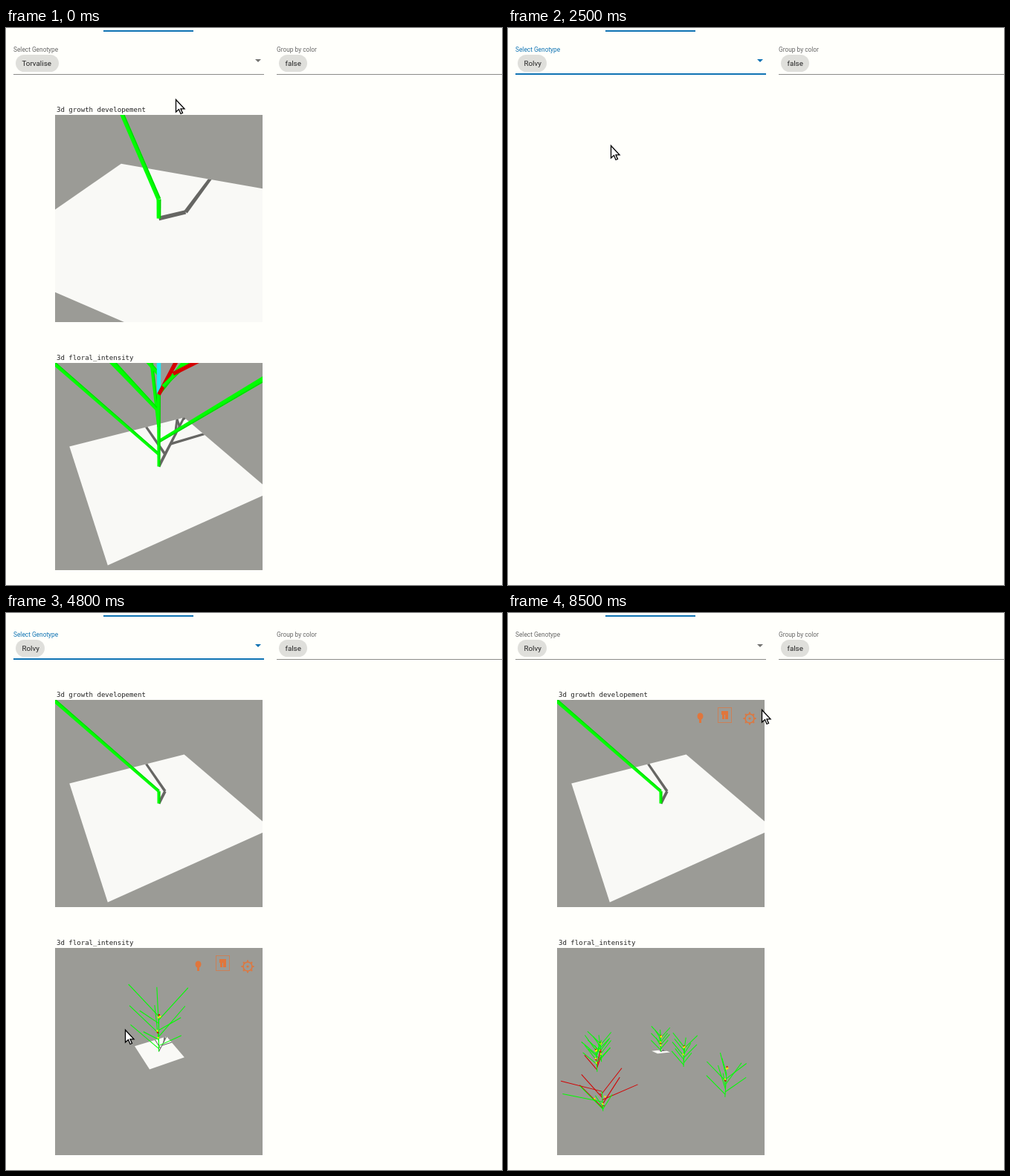
Write an HTML page with a canvas that moves like this. It is 667 px wide and 750 px high and loops after 8900 ms.

```html
<!DOCTYPE html>
<html lang="en">
<head>
<meta charset="utf-8">
<title>Plant growth dashboard</title>
<style>
  html, body { margin: 0; width: 100%; height: 100%; overflow: hidden; background: #fffffb; }
  canvas { display: block; }
</style>
</head>
<body>
<canvas id="stage" width="667" height="750"></canvas>
<script>
const ctx = document.getElementById('stage').getContext('2d');
const LOOP = 8900, SIZE = 279, MID = SIZE / 2, FOCAL = 300, LEFT = 66, THICK = .0138;
const BLUE = '#0f73b3', GREEN = '#0f0', RED = '#d40000', YELLOW = '#fff000', CYAN = '#20e8f8';
const NAMES = ['Torvalise', 'Balistrine', 'Rolvy'];
const rad = deg => deg * Math.PI / 180;

// Linear interpolation through [time, ...values] keys.
function track(keys, t) {
  if (t <= keys[0][0]) return keys[0].slice(1);
  for (let i = 1; i < keys.length; i++) {
    const [a, ...from] = keys[i - 1], [b, ...to] = keys[i];
    if (t <= b) return from.map((v, j) => v + (to[j] - v) * (t - a) / (b - a));
  }
  return keys[keys.length - 1].slice(1);
}

const POINTER = [[200, 228, 96], [600, 226, 50], [800, 226, 50], [1600, 138, 158], [2700, 138, 158],
  [3200, 146, 535], [3600, 160, 561], [5600, 160, 561], [6000, 153, 541], [6200, 153, 541],
  [6500, 179, 574], [7600, 179, 574], [8000, 340, 133], [8400, 340, 133], [8500, 341, 130]];
const DISTANCE = [[3600, 2.12], [4100, 2.611], [4200, 2.611], [4300, 3.5], [4400, 4.75], [4600, 4.75],
  [4700, 6.5], [4800, 8.5], [5000, 12.4], [5300, 12.4], [5500, 18.1], [6500, 18.1], [6800, 20.5],
  [7000, 20.5], [7200, 22.9]];
const ELEVATION = [[5600, 41.2], [6200, 13], [6500, 11.8]];
const PANEL = [[800, 0], [1100, 1], [1600, 1], [1700, .7], [1800, .28], [1900, .1], [2000, 0]];
const ARROW = [[800, 0], [1000, 180], [1600, 180], [1900, 0]];
const FOCUS = [[700, 0], [800, .6], [900, .9], [1000, 1], [5900, 1], [6000, .45], [6100, .12], [6200, .012], [6300, 0]];

const camera = (distance, elevation, turn = 0) => ({ distance, elevation: rad(elevation), turn: rad(turn) });

// Points are [x, y, height]; the camera orbits the origin.
function view([x, y, h], cam) {
  const c = Math.cos(cam.turn), s = Math.sin(cam.turn);
  const X = x * c - y * s, Y = x * s + y * c;
  const se = Math.sin(cam.elevation), ce = Math.cos(cam.elevation);
  return [X, Y * se - h * ce, cam.distance - Y * ce - h * se];
}
const flat = ([x, y, z]) => [MID + FOCAL * x / z, MID + FOCAL * y / z, FOCAL / z];

function polygon(points, color) {
  ctx.beginPath();
  points.forEach(p => ctx.lineTo(p[0], p[1]));
  ctx.closePath();
  ctx.fillStyle = color;
  ctx.fill();
}

function rod(from, to, color, cam) {
  const near = .09;
  let a = view(from, cam), b = view(to, cam);
  if (a[2] < near && b[2] < near) return;
  const cut = (p, q) => p.map((v, i) => v + (q[i] - v) * (near - p[2]) / (q[2] - p[2]));
  if (a[2] < near) a = cut(a, b);
  if (b[2] < near) b = cut(b, a);
  a = flat(a); b = flat(b);
  const len = Math.hypot(b[0] - a[0], b[1] - a[1]) || 1;
  const nx = (a[1] - b[1]) / len, ny = (b[0] - a[0]) / len;
  const side = (p, sign) => {
    const w = sign * Math.max(.5, THICK * p[2]);
    return [p[0] + nx * w, p[1] + ny * w];
  };
  polygon([side(a, 1), side(b, 1), side(b, -1), side(a, -1)], color);
  if (color === GREEN && a[2] > 90) {
    ctx.strokeStyle = 'rgba(0,110,0,.4)';
    ctx.lineWidth = 1;
    ctx.beginPath();
    ctx.moveTo(...side(a, .7));
    ctx.lineTo(...side(b, .7));
    ctx.stroke();
  }
}

// Leaves follow a spiral of nearly 2/5 turn along the stem.
function makePlant({ x = 0, y = 0, leaves = 11, start = 187, spread = 1, rise = 1, step = .142,
                     redLeaves = () => false, top = GREEN, extras = [], flowers = [] }) {
  const at = (dx, dy, h) => [x + dx, y + dy, h];
  const node = i => .148 + i * step;
  const rods = [];
  for (let i = 0; i < leaves; i++) {
    const angle = rad(start - 143 * i);
    rods.push([at(0, 0, node(i)), at(spread * Math.cos(angle), spread * Math.sin(angle), node(i) + rise),
      redLeaves(i) ? RED : GREEN]);
  }
  const split = Math.min(node(4), node(leaves - 1));
  rods.push([at(0, 0, 0), at(0, 0, split), GREEN]);
  if (leaves > 5) rods.push([at(0, 0, split), at(0, 0, node(leaves - 1)), top]);
  extras.forEach(([x1, h1, x2, h2, color]) => rods.push([at(x1, 0, h1), at(x2, 0, h2), color]));
  return { rods, flowers: flowers.map(([dx, h, color]) => [at(dx, 0, h), color]) };
}

function drawFlower([point, color], cam) {
  const p = view(point, cam);
  if (p[2] < .3) return;
  const [x, y, scale] = flat(p), r = Math.max(1.2, .034 * scale);
  if (color === YELLOW) {
    polygon([[x - r, y - r * .7], [x + r * .3, y - r * 1.1], [x + r, y - r * .8], [x + r * .8, y + r], [x - r * .2, y + r * .8]], color);
  } else {
    polygon([[x - r, y], [x - r * .5, y - r], [x + r * .5, y - r * .8], [x + r * 1.6, y + r * 1.2], [x - r * .3, y + r * .8]], color);
  }
}

const blooms = [[-.03, .66, YELLOW], [-.045, .9, RED], [-.06, .97, YELLOW], [-.02, 1.52, YELLOW], [.01, 1.62, RED], [.04, 1.56, YELLOW]];
const seedling = makePlant({ leaves: 1 });
const firstField = [makePlant({
  leaves: 9, redLeaves: i => i === 7, top: CYAN,
  extras: [[0, .71, .12, .945, RED], [.03, .77, .22, .96, GREEN], [.1, .86, .3, .96, RED]]
})];
const secondField = [
  makePlant({ flowers: blooms }),
  makePlant({ x: -5, y: 4.2, start: 170, flowers: blooms }),
  makePlant({ x: 1.76, y: 5.75, start: 205, flowers: blooms.slice(2) }),
  makePlant({ x: -4.55, y: 7.1, start: 200, redLeaves: i => i < 3, flowers: blooms }),
  makePlant({ x: 3.33, y: 11.57, start: 185, leaves: 9, flowers: blooms.slice(1) }),
  makePlant({ x: -2.6, y: 13.14, start: 215, leaves: 9, spread: 1.6, rise: .75, step: .1,
    redLeaves: i => i !== 3, flowers: [[-.35, .6, YELLOW], [.12, .7, YELLOW], [0, .35, YELLOW]],
    extras: [[0, .1, -.95, 1.2, GREEN], [0, .1, .45, .8, GREEN], [0, .2, -.3, .75, GREEN]] })
];

function drawIcons() {
  ctx.fillStyle = ctx.strokeStyle = '#e0763c';
  ctx.lineWidth = 1;
  ctx.beginPath();
  ctx.ellipse(192.5, 22, 4, 4.5, 0, 0, 7);
  ctx.fill();
  ctx.fillRect(191, 26, 3, 5);
  ctx.globalAlpha *= .7;
  ctx.strokeRect(216.5, 10.5, 18, 20);
  ctx.globalAlpha /= .7;
  ctx.fillRect(221, 15, 9, 5);
  ctx.fillRect(222, 20, 3, 6);
  ctx.fillRect(226, 20, 4, 6);
  ctx.beginPath();
  ctx.arc(259, 25, 6, 0, 7);
  ctx.lineWidth = 1.6;
  ctx.stroke();
  ctx.beginPath();
  ctx.arc(259, 25, 1.6, 0, 7);
  ctx.fill();
  for (let i = 0; i < 8; i++) {
    const a = i * Math.PI / 4;
    ctx.fillRect(258 + 7.5 * Math.cos(a), 24 + 7.5 * Math.sin(a), 2, 2);
  }
}

function drawScene(top, plants, cam, [px, py]) {
  ctx.save();
  ctx.translate(LEFT, top);
  ctx.beginPath();
  ctx.rect(0, 0, SIZE, SIZE);
  ctx.clip();
  ctx.fillStyle = '#9b9b96';
  ctx.fillRect(0, 0, SIZE, SIZE);

  const ground = [0, 1, 2, 3].map(i => {
    const a = rad(18.8 + 90 * i);
    return flat(view([Math.cos(a), Math.sin(a), 0], cam));
  });
  polygon(ground, '#f9f9f6');
  ctx.save();
  ctx.clip();
  const shade = ([x, y, h]) => [x + .43 * h, y - 1.27 * h, 0];
  plants[0].rods.forEach(([a, b]) => rod(shade(a), shade(b), '#666663', cam));
  ctx.restore();

  plants.forEach(plant => {
    plant.rods.forEach(([a, b, color]) => rod(a, b, color, cam));
    plant.flowers.forEach(f => drawFlower(f, cam));
  });
  if (px > LEFT && px < LEFT + SIZE + 1 && py > top && py < top + SIZE) drawIcons();
  ctx.restore();
}

function text(str, x, y, size, color = '#222', family = 'Roboto, sans-serif') {
  ctx.font = `${size}px ${family}`;
  ctx.fillStyle = color;
  ctx.fillText(str, x, y);
}
const heading = (str, top) => text(str, 68, top - 4, 9.05, '#222', '"DejaVu Sans Mono", monospace');
const loading = top => text('Loading widget...', 66, top + 11, 9.75);

function chip(str, x, width) {
  ctx.fillStyle = '#dfdfdb';
  ctx.beginPath();
  ctx.roundRect(x, 36, width, 23, 11.5);
  ctx.fill();
  text(str, x + 8.5, 51, 9.8);
}

function arrow(x, y, angle, color) {
  ctx.save();
  ctx.translate(x, y);
  ctx.rotate(rad(angle));
  polygon([[-4, -2], [4, -2], [0, 2]], color);
  ctx.restore();
}

function drawControls(t, [, py]) {
  const focused = t >= 800 && t < 6000, picked = t >= 1700;
  const [width] = track(FOCUS, t);
  ctx.fillStyle = BLUE;
  ctx.fillRect(131, 3, 121, 2);
  text('Select Genotype', 10, 32, 8.33, focused ? BLUE : '#666');
  text('Group by color', 364, 32, 8.33, '#666');
  chip(NAMES[picked ? 2 : 0], 13, picked ? 39 : 58);
  chip('false', 367, 38);
  ctx.fillStyle = py < 64 && t < 900 ? '#222' : '#8c8c89';
  ctx.fillRect(10, 62, 337, 1);
  ctx.fillStyle = '#8c8c89';
  ctx.fillRect(364, 62, 303, 1);
  ctx.fillStyle = width < .1 ? '#111' : BLUE;
  ctx.fillRect(178.5 - 168.5 * width, 61, 337 * width, 2);
  arrow(339, 44, track(ARROW, t)[0], focused ? BLUE : '#757572');
}

function drawPanel(t, [, py]) {
  const [alpha] = track(PANEL, t);
  if (!alpha) return;
  const active = t < 1700 ? 0 : 2, hover = Math.floor((py - 67) / 33.7);
  ctx.save();
  ctx.globalAlpha = alpha;
  ctx.shadowColor = 'rgba(0,0,0,.35)';
  ctx.shadowBlur = 8;
  ctx.shadowOffsetY = 3;
  ctx.fillStyle = '#fffffb';
  ctx.fillRect(10, 67, 337, 107);
  ctx.shadowColor = 'transparent';
  NAMES.forEach((name, i) => {
    const y = 67 + i * 33.7;
    if (i === active || i === hover) {
      ctx.fillStyle = i === active ? '#cfe2ee' : '#f0f0ec';
      ctx.fillRect(16, y + 1, 319, 33);
    }
    text(name, 21, y + 21, 11.2, i === active ? BLUE : '#222');
  });
  ctx.restore();
}

function drawPointer([x, y]) {
  ctx.save();
  ctx.translate(x + .5, y + .5);
  polygon([[0, 0], [0, 16.5], [4, 13], [6.5, 19], [9, 18], [6.5, 12.3], [11.5, 12.3]], '#fff');
  ctx.lineWidth = 1.3;
  ctx.strokeStyle = '#000';
  ctx.stroke();
  ctx.restore();
}

function drawWidgets(t, pointer) {
  const growth = '3d growth developement', floral = '3d floral_intensity';
  const firstReady = t >= 3400, secondTop = firstReady || t < 2900 ? 451 : 183;
  if (t < 2400 || t >= 2900) heading(growth, 117);
  if (t < 1800 || (t >= 2200 && t < 2400) || t >= 2900) heading(floral, secondTop);

  if (t < 2400) drawScene(117, [seedling], camera(1.47, 36, 49.2), t < 1700 ? [0, 0] : pointer);
  else if (firstReady) drawScene(117, [seedling], camera(2.12, 41.2), pointer);
  else if (t >= 2900) loading(117);

  if (t < 1800) drawScene(451, firstField, camera(2.12, 41.2), pointer);
  else if (t >= 3100) {
    drawScene(secondTop, secondField, camera(track(DISTANCE, t)[0], track(ELEVATION, t)[0]), pointer);
  } else if (t >= 2900) loading(183);
}

function draw(now) {
  const t = Math.floor(now % LOOP / 100) * 100;
  const pointer = track(POINTER, t).map(Math.round);
  ctx.fillStyle = '#fffffb';
  ctx.fillRect(0, 0, 667, 750);
  drawWidgets(t, pointer);
  drawControls(t, pointer);
  drawPanel(t, pointer);
  drawPointer(pointer);
}

let begin;
function tick(now) {
  begin ??= now;
  draw(now - begin);
  requestAnimationFrame(tick);
}
draw(0);
requestAnimationFrame(tick);
</script>
</body>
</html>
```
